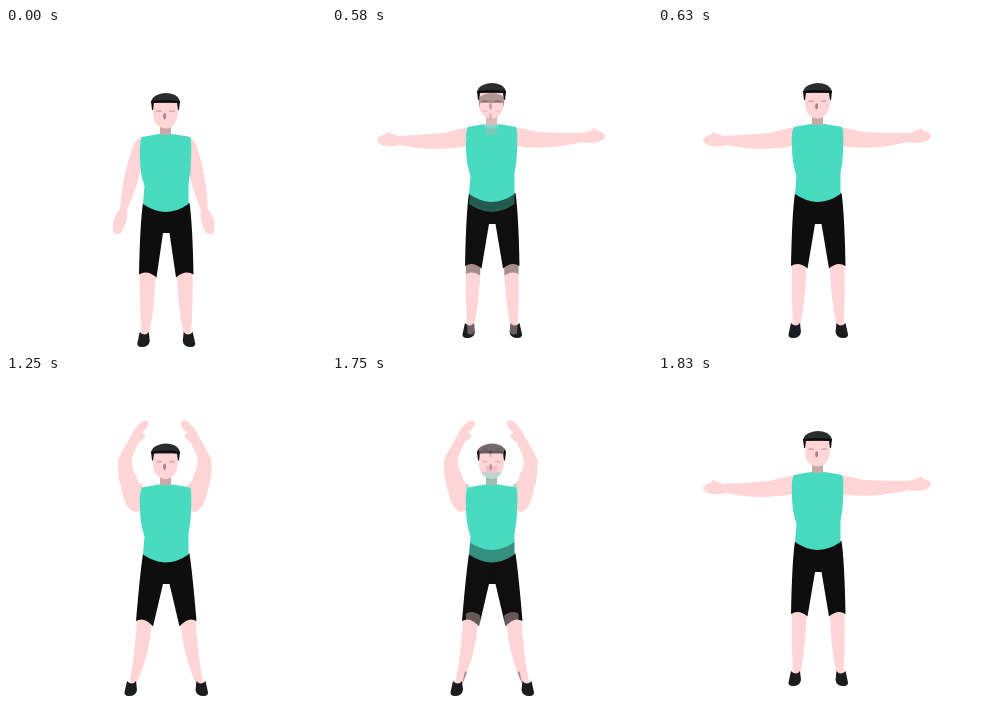
Animation of 320x320 px, one loop 2.42 s. Source, as an HTML page with a canvas:

```html
<!DOCTYPE html>
<html lang="en">
<head>
<meta charset="utf-8">
<title>Arm raises</title>
<style>
  html, body { margin: 0; height: 100%; overflow: hidden; background: #fff; }
  canvas { display: block; width: 320px; height: 320px; }
</style>
</head>
<body>
<canvas id="stage" width="320" height="320"></canvas>
<script>
const SIZE = 320, LOOP = 2420;
const SKIN = '#ffd5d5', SHIRT = '#48dbc1', BLACK = '#0e0e0e', HAIR = '#2a2d2e', SHOE = '#1a1c1d';

// dy: body offset; knee: outer x, y, inner x, y; mirror: transform that makes the right arm
const down = {
  dy: 0, knee: [133, 246.5, 150.5, 249.5], crotch: 205, ankle: [138.8, 304],
  mirror: [-1, 0, -0.03, 1, 321.3, 0],
  arm: 'M138 108Q129 110 126 121Q117 148 115 170Q115 180 112 184Q106 190 107 203Q109 208 115 205L120 195Q122 188 121 182Q128 166 132 152L136 135Z'
};
const side = {
  dy: -10, knee: [133, 238, 149.5, 240.5], crotch: 196, ankle: [138, 295],
  mirror: [-1, 0.045, 0, 1, 318, -6.1],
  arm: 'M138 99Q125 101 112 105Q88 107 66 108L54 104V106Q46 108 45 112Q46 117 54 118Q62 119 68 117Q88 121 104 121Q120 121 136 118Z'
};
const up = {
  dy: 2.5, knee: [130, 245, 147, 250.5], crotch: 208, ankle: [126, 305],
  mirror: [-1, 0, 0, 1, 317.5, 0],
  arm: 'M137 109Q131 107 130 99Q125 92 126 82Q130 72 133 66Q140 62 139 58L136 57Q143 51 143 46Q140 43 135 46Q127 54 124 62Q116 75 112 84Q111 100 116 115Q119 132 128 136L135 135Z'
};

function layer(paint) {
  const canvas = document.createElement('canvas');
  canvas.width = canvas.height = SIZE;
  paint(canvas.getContext('2d'));
  return canvas;
}

// Broken outline with a second one nested inside it
function hollowPart(ctx, shape, color) {
  ctx.save();
  ctx.fillStyle = '#fff';
  ctx.fill(shape);
  ctx.clip(shape);
  for (const [width, stroke, dash] of [[9, color, [6, 2]], [7, '#fff', []], [3, color, [7, 1]]]) {
    ctx.lineWidth = width;
    ctx.strokeStyle = stroke;
    ctx.setLineDash(dash);
    ctx.stroke(shape);
  }
  ctx.restore();
}

function figure(pose, hollow) {
  return layer(ctx => {
    const { dy, knee: [kx, ky, ix, iy], crotch, ankle: [ax, ay] } = pose;

    function part(path, color) {
      const shape = new Path2D(path);
      if (hollow) return hollowPart(ctx, shape, color);
      ctx.fillStyle = color;
      ctx.fill(shape);
    }
    function both(matrix, draw) {
      draw();
      ctx.save();
      ctx.transform(...matrix);
      draw();
      ctx.restore();
    }

    both(pose.mirror, () => part(pose.arm, SKIN));
    both([-1, 0, 0, 1, 320.5, 0], () => {
      part(`M${kx + 1} ${ky - 6}H${ix - 1}Q${ix - 1} ${ky + 28} ${ax + 4} ${ay + 4}H${ax - 3}Q${kx} ${ky + 28} ${kx + 1} ${ky - 6}Z`, SKIN);
      part(`M${ax - 5} ${ay}Q${ax} ${ay + 5} ${ax + 4} ${ay}L${ax + 5} ${ay + 9}Q${ax + 4} ${ay + 15} ${ax - 3} ${ay + 15}Q${ax - 9} ${ay + 15} ${ax - 7} ${ay + 9}Z`, SHOE);
      part(`M137 ${175 + dy}Q134 ${195 + dy} ${kx} ${ky}Q${kx + 8} ${ky - 5} ${ix} ${iy}L157 ${crotch}H160.5V${175 + dy}Z`, BLACK);
    });

    ctx.translate(0, dy);
    part('M154 96H165V108H154Z', '#c9aaa8');
    part('M136 109Q147 107 153 106Q160 108 166 106Q173 107 184 109Q186 112 185 133Q185 143 182.5 155V176Q171 184 159 184Q147 183 137 176L138.5 158Q134 145 134 130Q133 113 136 109Z', SHIRT);
    part('M147 74H172V86Q171 95 165 99Q160 102 154 99Q147 95 147 86Z', SKIN);
    part('M145 74Q146 69 151 67Q160 63 169 67Q174 70 174 75H145Z', HAIR);
    part('M145 73Q159 71 174 73L173 82H172L171 75Q159 73 148 75L147 82H146Z', BLACK);
    if (!hollow) {
      part('M150 83Q153 81 156 83V84H150ZM163 83Q166 81 169 83V84H163Z', '#d8adad');
      part('M158 85L160 86V90L158 92L157 88Z', '#a98282');
    }
  });
}

const solid = new Map([down, side, up].map(pose => [pose, figure(pose)]));

function tint(ctx, pose, alpha) {
  ctx.globalCompositeOperation = 'source-atop';
  ctx.globalAlpha = alpha;
  ctx.drawImage(solid.get(pose), 0, 0);
}

const blend = (base, over) => layer(ctx => {
  ctx.drawImage(solid.get(base), 0, 0);
  tint(ctx, over, 0.37);
});

// Shared area stays solid, the rest is left as broken outlines
const cross = (from, to) => layer(ctx => {
  const shared = layer(c => {
    c.drawImage(solid.get(to), 0, 0);
    c.globalCompositeOperation = 'destination-in';
    c.drawImage(solid.get(from), 0, 0);
    tint(c, from, 0.45);
  });
  for (const image of [figure(from, true), figure(to, true), shared]) ctx.drawImage(image, 0, 0);
});

const steps = [
  [0, solid.get(down)],
  [540, blend(down, side)],
  [580, blend(side, down)],
  [630, solid.get(side)],
  [1210, cross(side, up)],
  [1250, solid.get(up)],
  [1750, blend(up, side)],
  [1790, blend(side, up)],
  [1830, solid.get(side)]
];

const stage = document.getElementById('stage').getContext('2d');
const start = performance.now();

function render() {
  const t = (performance.now() - start) % LOOP;
  const [, image] = steps.findLast(([at]) => at <= t);
  stage.fillStyle = '#fff';
  stage.fillRect(0, 0, SIZE, SIZE);
  stage.drawImage(image, 0, 0);
  requestAnimationFrame(render);
}
render();
</script>
</body>
</html>
```
